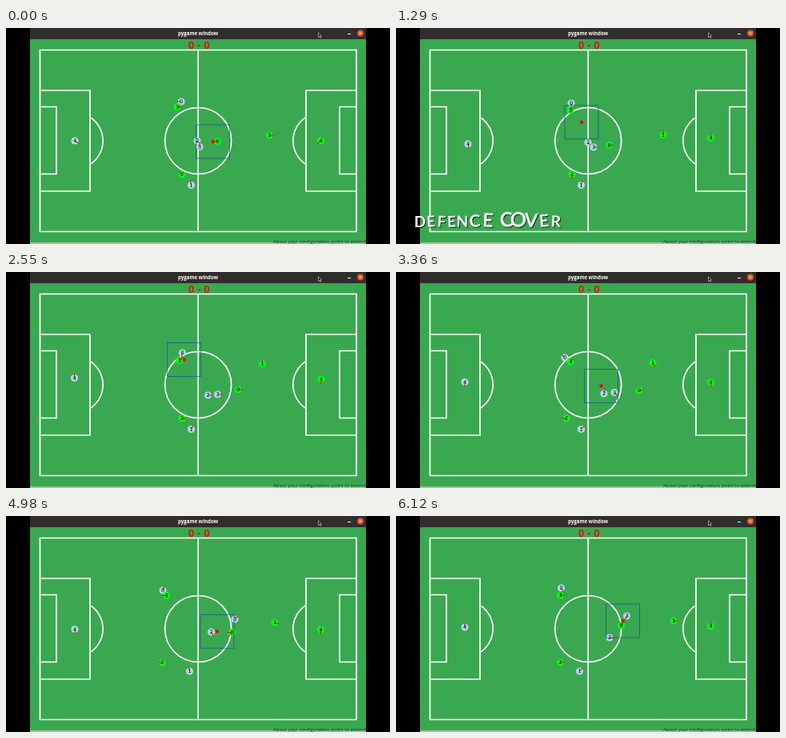
Recreate the animation shown at these times as an HTML page. Size 480 px wide and 270 px high, loop 6570 ms.

```html
<!DOCTYPE html>
<html lang="en">
<head>
<meta charset="utf-8">
<title>Defence cover</title>
<style>
@property --h { syntax: "<angle>"; inherits: true; initial-value: 0deg; }
html, body { margin: 0; width: 100%; height: 100%; overflow: hidden; background: #000; }
svg { display: block; width: 100%; height: 100%; }
text { text-anchor: middle; }
.lines { fill: none; stroke: #fff; stroke-width: 1.7; }
.bar { font: bold 6.2px "Open Sans", "Noto Sans", sans-serif; fill: #fff; }
.score { font: bold 13.5px "Liberation Sans", Arial, sans-serif; fill: #f00a0a; }
.note { font: 6px "Open Sans", sans-serif; fill: #153d1e; text-anchor: start; }
.player, .ball { animation: 6570ms linear infinite; }
.player circle { fill: #add8e6; }
.player.g circle { fill: #06f916; }
.player line { stroke: #f00; stroke-width: 1; transform: rotate(var(--h)); }
.player text { font: 6.6px "DejaVu Sans", sans-serif; fill: #111; }
.ball { animation-name: ball; }
.ball rect { fill: none; stroke: #1a4f9a; stroke-width: .7; }
.title { opacity: 0; animation: show 6570ms linear infinite; filter: drop-shadow(1.2px 1.4px .7px #000b); }
.title text {
  font: bold 19px Lato, sans-serif; fill: #fff;
  transform-box: fill-box; transform-origin: center;
  animation: bump 6570ms ease-in-out infinite;
}

@keyframes show { 0%, 6.85% { opacity: 0 } 10.5%, 33% { opacity: 1 } 36.5%, 100% { opacity: 0 } }
@keyframes bump {
  0%, 15.8%, 23.4%, 100% { scale: 1; translate: 0 0 }
  19.6% { scale: 1.35; translate: 0 -2.5px }
}

/* Stage positions and headings */
@keyframes b0 {
  0%, 6.85% { translate: 219px 92px; --h: 180deg }
  19.63% { translate: 219px 94px; --h: 90deg }
  38.81% { translate: 220.5px 101px; --h: 100deg }
  51.14% { translate: 211px 107px; --h: 225deg }
  64.38% { translate: 199px 103.5px; --h: 360deg }
  75.8% { translate: 196px 93px; --h: 290deg }
  93.15%, 100% { translate: 206.5px 90px; --h: 420deg }
}
@keyframes b1 {
  0%, 6.85% { translate: 231.5px 196.5px; --h: -100deg }
  19.63% { translate: 231.5px 196.5px; --h: -80deg }
  38.81% { translate: 231.5px 196.5px; --h: -60deg }
  51.14% { translate: 231.5px 196.5px; --h: -45deg }
  64.38% { translate: 231.5px 196px; --h: -60deg }
  75.8% { translate: 229.5px 194px; --h: -100deg }
  93.15%, 100% { translate: 229.5px 194px; --h: -45deg }
}
@keyframes b2 {
  0%, 6.85% { translate: 239px 141px; --h: 45deg }
  19.63% { translate: 240px 143px; --h: 45deg }
  38.81% { translate: 252.5px 154px; --h: 0deg }
  51.14% { translate: 260px 152px; --h: -80deg }
  64.38% { translate: 252px 148.5px; --h: 0deg }
  75.8% { translate: 256.5px 145px; --h: 60deg }
  93.15%, 100% { translate: 267px 152px; --h: 10deg }
}
@keyframes b3 {
  0%, 6.85% { translate: 242px 148.5px; --h: -90deg }
  19.63% { translate: 247px 149px; --h: 0deg }
  38.81% { translate: 264.5px 153px; --h: 0deg }
  51.14% { translate: 273px 150.5px; --h: 45deg }
  64.38% { translate: 279.5px 139.5px; --h: -60deg }
  75.8% { translate: 286px 129px; --h: -45deg }
  93.15%, 100% { translate: 288.5px 125px; --h: 120deg }
}
@keyframes b4 {
  0%, 6.85% { translate: 86px 141px; --h: 35deg }
  19.63% { translate: 90px 145px; --h: 80deg }
  38.81% { translate: 85.5px 132.5px; --h: -90deg }
  51.14% { translate: 86px 137.5px; --h: 90deg }
  64.38%, 75.8% { translate: 86px 141.5px; --h: 90deg }
  93.15%, 100% { translate: 86px 139px; --h: -90deg }
}
@keyframes g0 {
  0%, 6.85% { translate: 264.5px 141.5px; --h: 180deg }
  19.63% { translate: 266.5px 146.5px; --h: 0deg }
  38.81% { translate: 290px 147px; --h: 0deg }
  51.14% { translate: 304px 148px; --h: 0deg }
  64.38% { translate: 294.5px 147px; --h: 180deg }
  75.8% { translate: 282.5px 145.5px; --h: 180deg }
  93.15%, 100% { translate: 281.5px 137px; --h: 300deg }
}
@keyframes g1 {
  0%, 6.85% { translate: 329px 134px; --h: 0deg }
  19.63% { translate: 334px 133.5px; --h: -90deg }
  38.81% { translate: 320.5px 115px; --h: -90deg }
  51.14% { translate: 321px 113.5px; --h: 60deg }
  64.38% { translate: 328px 125px; --h: 60deg }
  75.8% { translate: 336px 133px; --h: 20deg }
  93.15%, 100% { translate: 347px 131px; --h: 0deg }
}
@keyframes g2 {
  0%, 6.85% { translate: 220px 183px; --h: 225deg }
  19.63% { translate: 220px 183px; --h: 90deg }
  38.81% { translate: 220px 183px; --h: 0deg }
  51.14% { translate: 213px 183px; --h: 180deg }
  64.38% { translate: 201px 183px; --h: 180deg }
  75.8% { translate: 195.5px 183px; --h: 180deg }
  93.15%, 100% { translate: 205.5px 183px; --h: 0deg }
}
@keyframes g3 {
  0%, 6.85% { translate: 214px 98.5px; --h: 0deg }
  19.63% { translate: 218px 102.5px; --h: -45deg }
  38.81% { translate: 217px 110.5px; --h: -45deg }
  51.14% { translate: 218px 112px; --h: -45deg }
  64.38% { translate: 209.5px 103.5px; --h: -180deg }
  75.8% { translate: 200.5px 99.5px; --h: -180deg }
  93.15%, 100% { translate: 205.5px 99px; --h: 0deg }
}
@keyframes g4 {
  0%, 6.85% { translate: 393.5px 141px; --h: 135deg }
  19.63% { translate: 393.5px 137.5px; --h: -90deg }
  38.81% { translate: 394px 134px; --h: 90deg }
  51.14% { translate: 393.5px 138px; --h: 90deg }
  64.38%, 75.8% { translate: 393.5px 142px; --h: 90deg }
  93.15%, 100% { translate: 393.5px 138px; --h: -90deg }
}
@keyframes ball {
  0%, 6.85% { translate: 258.7px 142px }
  19.63% { translate: 232px 117.8px }
  38.81% { translate: 222.7px 109.5px }
  51.14% { translate: 256.5px 142.5px }
  64.38% { translate: 259px 145.5px }
  75.8% { translate: 264px 144.2px }
  93.15%, 100% { translate: 283.5px 131px }
}
</style>
</head>
<body>
<svg viewBox="0 0 480 270">
  <rect width="480" height="270"/>
  <rect x="30" y="14" width="420" height="256" fill="#3aa850"/>
  <rect x="30" y="268" width="420" height="2" fill="#9cc4a3"/>
  <svg x="330" y="264.5" width="120" height="5.5" viewBox="330 264.5 120 5.5">
    <text class="note" x="334" y="268.5">About your configuration, point to extend</text>
  </svg>

  <rect x="30" width="420" height="14" fill="#302e2d"/>
  <text class="bar" x="240" y="9.2">pygame window</text>
  <path d="M390.5 5.8v5.8l1.3-1.2 1 2 .9-.5-1-1.9h1.7z" fill="#111" stroke="#ddd" stroke-width=".6"/>
  <path d="M427 7.6h4" stroke="#fff" stroke-width="1"/>
  <circle cx="443" cy="6.6" r="4" fill="#e95420"/>
  <path d="M441.6 5.2l2.8 2.8m0-2.8l-2.8 2.8" stroke="#fff" stroke-width=".8"/>

  <g class="lines">
    <path d="M42.5 27.5H438V254.5H42.5zM240.2 27.5V254.5"/>
    <circle cx="240.2" cy="141" r="41.5"/>
    <path d="M42.5 78H105V204H42.5M42.5 98.5H63V182.5H42.5M105 111.5A35 35 0 0 1 105 170.5"/>
    <path d="M438 78H375V204H438M438 98.5H417V182.5H438M375 111.5A35 35 0 0 0 375 170.5"/>
  </g>
  <text class="score" x="241.3" y="25.6">0 - 0</text>

  <g id="players"></g>
  <g class="ball">
    <rect x="-21" y="-21" width="42" height="42"/>
    <circle r="2.2" fill="#f00"/>
  </g>
  <g class="title" id="title"></g>
</svg>
<script>
const add = (parent, tag, attrs, text = "") => {
  const el = document.createElementNS("http://www.w3.org/2000/svg", tag);
  for (const key in attrs) el.setAttribute(key, attrs[key]);
  el.textContent = text;
  return parent.appendChild(el);
};

const players = document.getElementById("players");
for (const team of "bg") {
  for (let n = 0; n < 5; n++) {
    const g = add(players, "g", { class: "player " + team, style: `animation-name:${team}${n}` });
    add(g, "circle", { r: 4.6 });
    add(g, "line", { x2: 5.4 });
    add(g, "text", { y: 2.4 }, n);
  }
}

// Each letter swells in turn, left to right
const title = document.getElementById("title");
const xs = [30, 43.5, 57, 69.5, 83, 98.5, 115, 138, 153, 169, 185, 200];
const tilts = [0, -3, 3, -2, 2, -3, 3, -5, 4, 3, -5, 3];
[..."DEFENCECOVER"].forEach((letter, i) => add(title, "text", {
  x: xs[i], y: 248.5,
  style: `rotate:${tilts[i]}deg;animation-delay:${(i - 7.5) * 60}ms`
}, letter));
</script>
</body>
</html>
```
